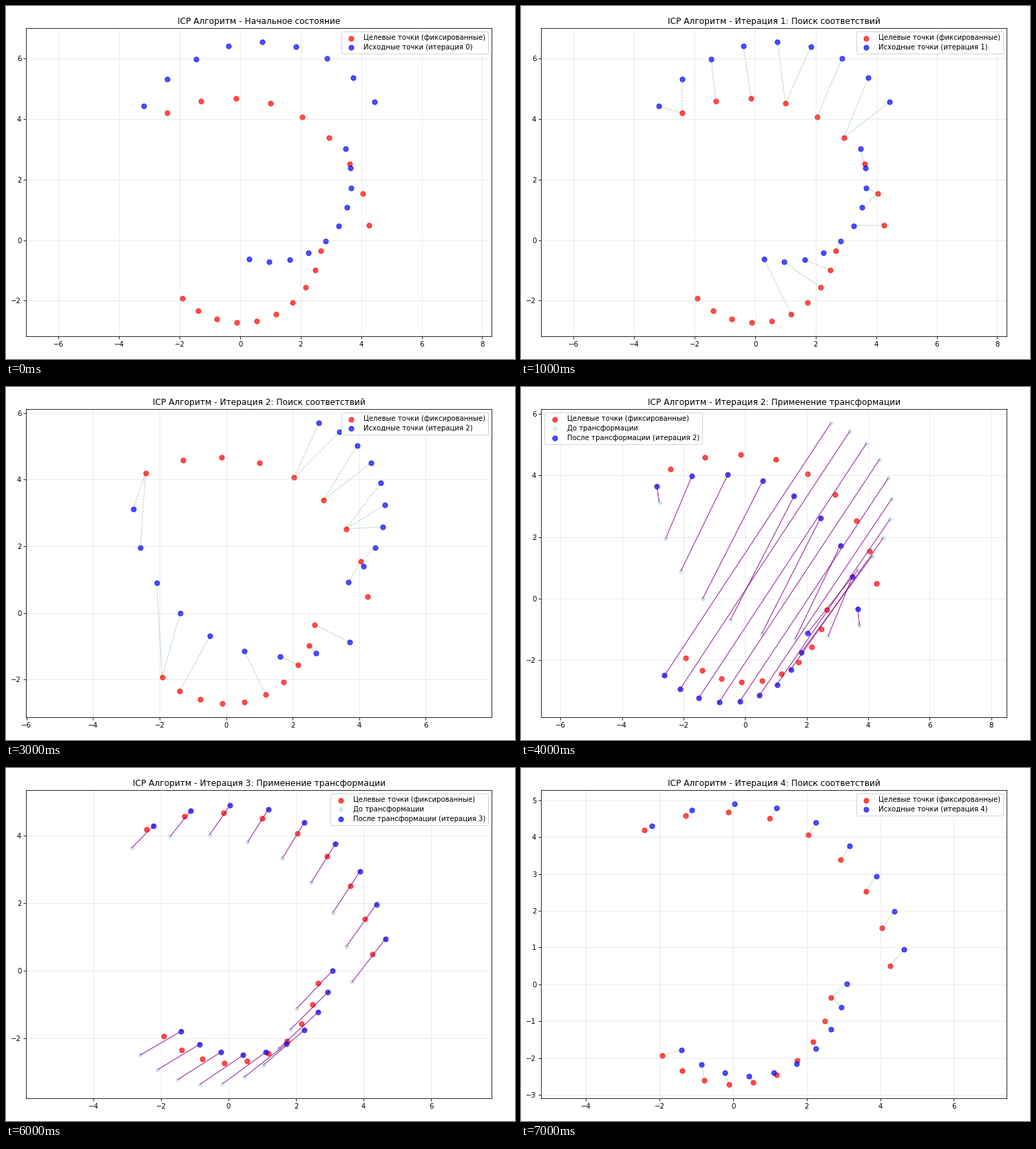
Write a matplotlib script that moves like this. It is 739 px wide and 512 px high and loops after 8000 ms.

```python
import numpy as np
import matplotlib.pyplot as plt
from matplotlib.animation import FuncAnimation

W, H, DPI = 739, 512, 73

# Scan in polar form: an outer arc followed by an inner one.
angles = np.radians(np.linspace(120, -135, 19))
radii = np.array([4.846, 4.765, 4.68, 4.62, 4.545, 4.475, 4.403, 4.331, 4.29,
                  2.683, 2.675, 2.67, 2.70, 2.72, 2.725, 2.72, 2.715, 2.72, 2.72])
target = radii * np.exp(1j * angles)


def rigid(points, degrees, shift):
    return points * np.exp(1j * np.radians(degrees)) + shift


# Source cloud before the first and after each later alignment step;
# the first step lands on a mirrored solution.
poses = [
    rigid(target, 30, 1 + 2j),
    rigid(target.conj(), -60.58, 2.055 + 3.077j),
    rigid(target, -2.36, -0.615 - 0.648j),
    rigid(target, 2.91, 0.415 + 0.231j),
]

fig = plt.figure(figsize=(W / DPI, H / DPI), dpi=DPI, facecolor="white")
ax = fig.add_axes([29.4 / W, 32.7 / H, 676 / W, 447.2 / H])


def dots(points, color, label, size=50, alpha=0.7):
    ax.scatter(points.real, points.imag, c=color, s=size, alpha=alpha, label=label)


def finish(title, loc):
    ax.set_title("ICP Алгоритм - " + title)
    ax.grid(True, alpha=0.3)
    ax.axis("equal")
    ax.legend(loc=loc, labelspacing=0.38)


def draw_search(step):
    """Source cloud, joined to its nearest targets once iterating."""
    source = poses[max(step - 1, 0)]
    dots(target, "red", "Целевые точки (фиксированные)")
    dots(source, "blue", f"Исходные точки (итерация {step})")
    if step == 0:
        finish("Начальное состояние", "upper right")
        return
    nearest = np.abs(source[:, None] - target[None, :]).argmin(axis=1)
    for a, b in zip(source, target[nearest]):
        ax.plot([a.real, b.real], [a.imag, b.imag], "g--", alpha=0.4, linewidth=0.8)
    finish(f"Итерация {step}: Поиск соответствий", "upper right")


def draw_apply(step):
    """Arrows from the old pose to the new one."""
    before, after = poses[step - 1], poses[step]
    dots(target, "red", "Целевые точки (фиксированные)")
    dots(before, "lightblue", "До трансформации", size=30, alpha=0.5)
    dots(after, "blue", f"После трансформации (итерация {step})")
    for a, d in zip(before, after - before):
        ax.arrow(a.real, a.imag, d.real, d.imag, head_width=0.05,
                 head_length=0.05, fc="purple", ec="purple", alpha=0.6)
    finish(f"Итерация {step}: Применение трансформации", "best")


def update(frame):
    ax.cla()
    step = (frame + 1) // 2
    if frame == 0 or frame % 2:
        draw_search(step)
    else:
        draw_apply(step)
    return []


anim = FuncAnimation(fig, update, frames=8, interval=1000,
                     init_func=lambda: [], repeat=True, repeat_delay=0)
plt.show()
```
